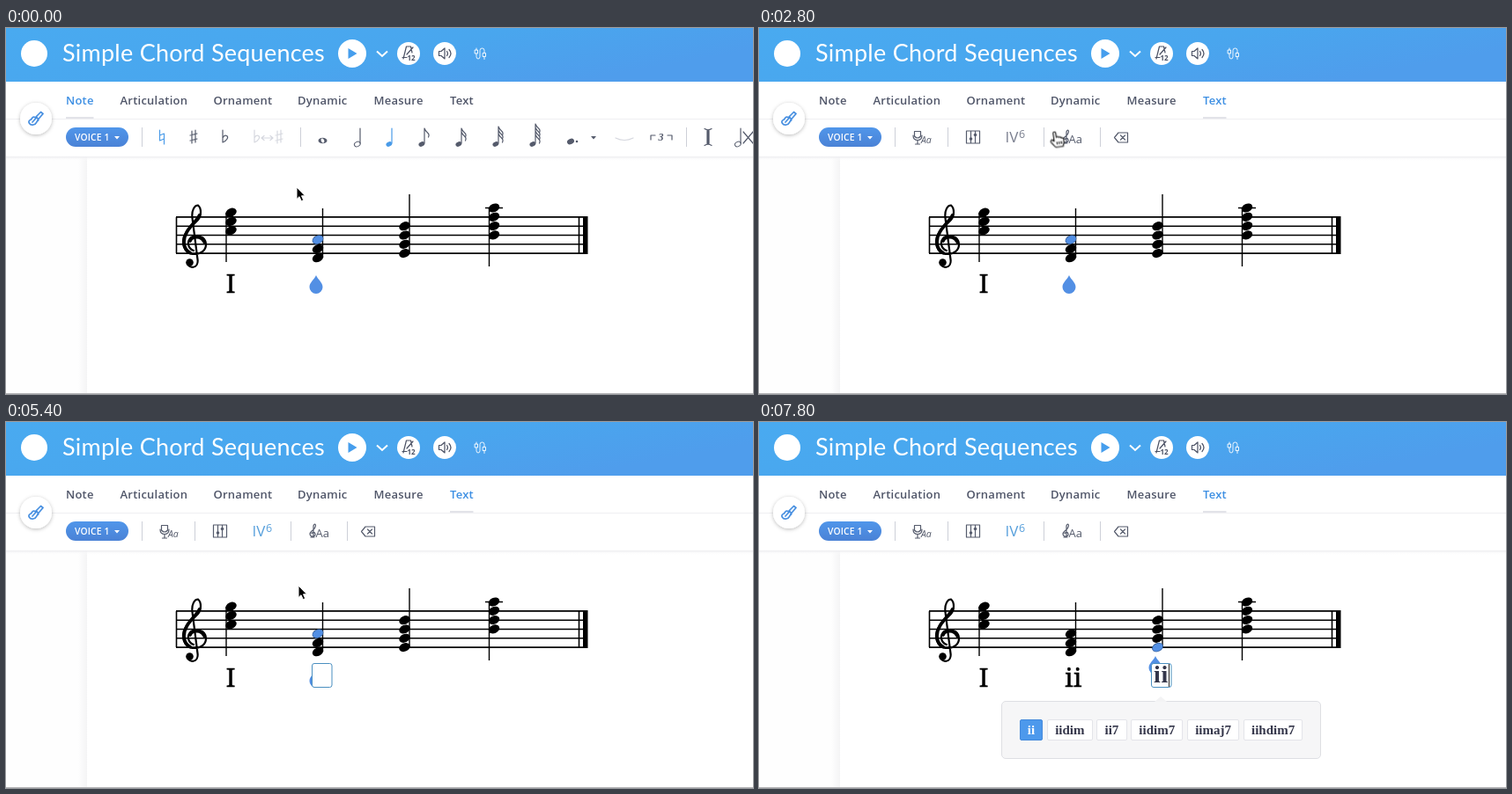
Write an HTML page that moves like this. It is 848 px wide and 416 px high and loops after 8000 ms.

```html
<!DOCTYPE html>
<html lang="en">
<head>
<meta charset="utf-8">
<title>Chord editor</title>
<style>
  html, body { margin: 0; width: 100%; height: 100%; overflow: hidden; background: #fff; }
  #stage { position: relative; width: 848px; height: 416px; overflow: hidden; }
  svg { position: absolute; inset: 0; }
  text { font-family: "Open Sans", sans-serif; }
  .title { font: 27px Lato, sans-serif; letter-spacing: .25px; fill: #fff; }
  .tab { font-size: 13px; font-weight: 600; letter-spacing: .25px; color: #505669; fill: currentColor; }
  .line { fill: none; stroke: currentColor; stroke-width: 1.2; stroke-linecap: round; stroke-linejoin: round; }
  .thin { stroke-width: .9; }
  .bold { stroke-width: 1.7; }
  .tools { color: #555b6c; fill: currentColor; }
  .numeral { font: 500 29px "Noto Serif", serif; text-anchor: middle; stroke: #000; stroke-width: .5; }
  .entry { font: bold 28px "Liberation Serif", serif; letter-spacing: .6px; text-anchor: middle; fill: #34364a; }
  .tip { font-size: 12px; font-weight: 600; letter-spacing: .8px; fill: #fff; text-anchor: middle; }
  .menu {
    position: absolute; top: 317px; transform: translateX(-50%); box-sizing: border-box; height: 66px;
    display: flex; gap: 4.4px; padding: 20px; border: 1px solid #dedfe3; border-radius: 5px;
    background: #f6f6f7; font: bold 15px/22px "Liberation Serif", serif; color: #34364a;
  }
  .menu::before {
    content: ""; position: absolute; left: 50%; top: -6px; margin-left: -7px;
    border: 7px solid transparent; border-top: 0; border-bottom: 6px solid #f3f3f4;
  }
  .menu span { height: 22px; padding: 0 8.3px; border: 1px solid #e3e4e9; border-radius: 2px; background: #fff; }
  .menu span:first-child { background: #4d99ec; border-color: #4389dc; color: #fff; }
</style>
</head>
<body>
<div id="stage">
<svg width="848" height="416" viewBox="0 0 848 416">
  <defs>
    <linearGradient id="sky" x2="1" y2=".4"><stop stop-color="#49aaf0"/><stop offset=".6" stop-color="#49a6ee"/><stop offset="1" stop-color="#4f9dec"/></linearGradient>
    <linearGradient id="pillFill" x2="0" y2="1"><stop stop-color="#5096ea"/><stop offset="1" stop-color="#4a82d6"/></linearGradient>
    <linearGradient id="edge"><stop stop-color="#fefefe"/><stop offset="1" stop-color="#f4f4f5"/></linearGradient>
    <linearGradient id="fall" x2="0" y2="1"><stop stop-color="#ececef"/><stop offset="1" stop-color="#fff" stop-opacity="0"/></linearGradient>
    <filter id="soft" x="-50%" y="-50%" width="200%" height="200%"><feDropShadow dx="0" dy="1" stdDeviation="2" flood-opacity=".28"/></filter>
    <path id="flat" class="line" d="M-2-9V5C3 3 5-1 2.500-2.500C1-3.200-1-2-2 0"/>
    <path id="sharp" class="line" d="M-2-7V7M2-8V6M-4-2l8-2M-4 4l8-2"/>
    <path id="drop" d="M0 0C2 5 7.500 8 7.500 13.500A7.500 7.500 0 0 1-7.500 13.500C-7.500 8-2 5 0 0Z" fill="#528fe4"/>
  </defs>

  <rect width="848" height="416" fill="#fff"/>
  <rect y="146" width="82" height="270" fill="#fefefe"/>
  <rect x="82" y="146" width="10" height="270" fill="url(#edge)"/>
  <rect y="146" width="848" height="5" fill="url(#fall)"/>
  <path d="M0 415.500H848" stroke="#b4b4b6"/>
  <path d="M0 103.500H848" stroke="#efeff2"/>

  <!-- header -->
  <rect width="848" height="61" fill="url(#sky)"/>
  <circle cx="32" cy="29" r="15" fill="#fff"/>
  <text class="title" x="64" y="38">Simple Chord Sequences</text>
  <g fill="#fff"><circle cx="393" cy="29" r="16"/><circle cx="457" cy="29" r="13"/><circle cx="498" cy="29" r="13"/></g>
  <path d="M388.500 23V35L398.500 29Z" fill="#469eed"/>
  <path d="M421 26.500l6 5.500 6-5.500" fill="none" stroke="#fff" stroke-width="2"/>
  <g class="line" color="#4b5164">
    <path d="M451 35L454.500 21H459.500L461 28M455 30L462 22M450 33.500H455"/>
    <path d="M491.500 26.500H494L498 23V35L494 31.500H491.500ZM500.500 26.500q2 2.500 0 5M503 24.500q4 4.500 0 9"/>
  </g>
  <text x="455.500" y="37" font-size="8" font-weight="700" fill="#4b5164">12</text>
  <path class="line thin" color="#fff" d="M534 23v2M532.500 25h3v4h-3zM534 29v3.500q0 2.500 2 2.500t2-2.500V25.500q0-2.500 2.500-2.500t2.500 2.500v3M541.500 28.500h3v4h-3zM543 32.500v3"/>

  <!-- tabs -->
  <g id="tabs"></g>
  <path id="noteBar" d="M68 102H99.500" stroke="#e2e3e9" stroke-width="2"/>
  <path id="textBar" d="M504 102H530.500" stroke="#e2e3e9" stroke-width="2"/>
  <circle cx="34" cy="103" r="18" fill="#fff" filter="url(#soft)"/>
  <path class="line bold" color="#478fe0" d="M33 102L39.500 95.500L42 97.500L36 104.500M33 101.500C29 100 30 104 27.500 104.500C24 106 27 111 31 110C35 109.500 34 106.500 36 105.500C38 104 36 102 33 101.500M30 107L35 101.500"/>
  <rect x="68" y="113" width="71" height="22" rx="11" fill="url(#pillFill)"/>
  <text x="78" y="128" font-size="10.300" font-weight="600" letter-spacing=".15" fill="#fff">VOICE 1</text>
  <path d="M123 123h6l-3 3.500z" fill="#fff"/>
  <path d="M154.500 113V135" stroke="#cdd0d8"/>

  <!-- note tools -->
  <g id="noteTools" class="tools">
    <path d="M334.500 113V135M772.500 113V135" stroke="#cdd0d8"/>
    <path class="line" color="#4a9be8" d="M174.500 116V128L179.500 126M179.500 132V120L174.500 122"/>
    <use href="#sharp" x="213" y="124"/><use href="#flat" x="248" y="125"/>
    <g color="#d6d8df"><use href="#flat" x="284" y="125"/><use href="#sharp" x="310" y="124"/>
      <path class="line" d="M290 125H303M293 122.500L290 125L293 127.500M300 122.500L303 125L300 127.500"/></g>
    <g id="durations"></g>
    <ellipse cx="641" cy="129" rx="4.200" ry="3" transform="rotate(-25 641 129)"/><circle cx="648" cy="129" r="1.300"/>
    <path d="M664 123h6l-3 3.500z"/>
    <path class="line" color="#d6d8df" d="M692 125Q702 130 712 125"/>
    <path class="line" d="M732 127V122H737M751 122H756V127"/>
    <text x="740.500" y="128" style="font:italic bold 12px 'Liberation Serif',serif">3</text>
    <path class="line" d="M793 114.500Q797 117 801 114.500M793 133.500Q797 131 801 133.500M797 116V132M796 116V132M798 116V132"/>
    <path class="line" d="M837 118L848 131M848 118L837 131"/>
  </g>

  <!-- text tools -->
  <g id="textTools" class="tools">
    <path d="M214.500 113V135M323.500 113V135M387.500 113V135" stroke="#cdd0d8"/>
    <path class="line" d="M176.500 117.500h7v5.500q-3.500 4-7 0zM175 122q0 5.500 5 5.500t5-5.500M180 127.500V132M177.500 132h5"/>
    <text x="184" y="131" font-size="10.500" font-style="italic">Aa</text>
    <path class="line" d="M235.500 117H250.500V131H235.500ZM240.500 117V131M245.500 117V131"/>
    <circle cx="240.500" cy="126" r="1.800"/><circle cx="245.500" cy="121.500" r="1.800"/>
    <g id="chordTool" color="#7b8090" fill="currentColor">
      <text x="279.500" y="130" font-size="17">IV</text><text x="295" y="125" font-size="12.500">6</text>
    </g>
    <path class="line" d="M349 131V118q1-3 2.500-1q0 4-4.500 7q-4 4 0 6q5 0 4-3t-4-.5M346 131h4"/>
    <text x="351.500" y="131" font-size="13">Aa</text>
    <path class="line" d="M403.500 124.500L408 119H418.500V130H408ZM410.500 122l5 5M415.500 122l-5 5"/>
  </g>

  <!-- score -->
  <g id="staff" stroke="#000" stroke-width="1.600"></g>
  <rect x="655" y="214" width="5.500" height="43"/>
  <g fill="none" stroke="#000" stroke-linecap="round">
    <path stroke-width="2.200" d="M206 267C207 274 219 274 217.500 263L211.500 216C210.500 207 214 201.500 218 201.500C222 205 222 213 218 218C212 225 201 231 201 243C201 252 207 257 214 257C221 257 227 253 227 246C227 239 221 236 216 236C210 236 206 241 207 246C207.500 249 210 252 213 253"/>
    <path stroke-width="3.800" d="M219.500 213C215 222 202 230 202 243C202 249 205 254 209 255.500M209 242C211 236 222 236 225 243"/>
  </g>
  <circle cx="208.500" cy="266.500" r="4.300"/>
  <g id="chords"></g>
  <text class="numeral" x="255" y="301">I</text>
  <text class="numeral" id="committed" x="357" y="301" letter-spacing=".5">ii</text>
  <g id="entries"></g>

  <g id="tooltip">
    <path d="M285 147L292 140L299 147Z" fill="#2d2e3d"/>
    <rect x="198" y="145.500" width="187" height="31.500" rx="15.750" fill="#2d2e3d"/>
    <text class="tip" x="292" y="165.500">Classic chord (⌘ + ⇧ + K)</text>
  </g>
</svg>
<div id="menus"></div>
<svg width="848" height="416" viewBox="0 0 848 416">
  <g id="pointer">
    <path id="arrow" d="M0 0V13.500L3 10.700L5.300 15.700L7.700 14.600L5.500 9.800H9.500Z" stroke="#fff" stroke-width="1"/>
    <path id="hand" transform="rotate(-8)" fill="#fff" stroke="#000" stroke-width="1.100" stroke-linejoin="round"
      d="M-1.500 1C-1.500-1 1.500-1 1.500 1V6C2 5 4 5 4.300 6.500C5 5.600 7 6 7 7.500C8 7 9.500 7.500 9.500 9V12C9.500 14 8 15 8 17H-.5C-2 15-4 13-5 11C-6 9-4 7.500-3 8.500L-1.500 10ZM1.500 11V14M4 11V14M6.500 11V14"/>
  </g>
</svg>
</div>
<script>
const LOOP = 8000, TICK = 200, BLUE = '#528fe4';
const $ = id => document.getElementById(id);
const add = (id, markup) => $(id).insertAdjacentHTML('beforeend', markup);

// Hard changes: table of [ms, value]
function steps(id, prop, table) {
  const frames = table.map(([ms, value]) => ({ offset: ms / LOOP, [prop]: value, easing: 'steps(1, end)' }));
  frames.push({ offset: 1, [prop]: table.at(-1)[1] });
  $(id).animate(frames, { duration: LOOP, iterations: Infinity });
}

function show(id, ...ranges) {
  const table = ranges[0][0] ? [[0, 0]] : [];
  for (const [from, to = LOOP] of ranges) {
    table.push([from, 1]);
    if (to < LOOP) table.push([to, 0]);
  }
  steps(id, 'opacity', table);
}

// Tabs and durations
[['Note', 68], ['Articulation', 129.5], ['Ornament', 235.5], ['Dynamic', 331], ['Measure', 417.5], ['Text', 504]]
  .forEach(([label, x]) => add('tabs', `<text class="tab" id="tab${label}" x="${x}" y="87">${label}</text>`));

const head = (x, y, rx, ry, extra = '') =>
  `<ellipse cx="${x}" cy="${y}" rx="${rx}" ry="${ry}" transform="rotate(-25 ${x} ${y})" ${extra}/>`;

function duration(x, flags, top, { open = false, color = 'currentColor' } = {}) {
  let marks = `M${x} 131V${top}`;
  for (let i = 0; i < flags; i++) marks += `M${x} ${top + i * 4}q1 3 3.500 5t1 5`;
  const fill = open ? 'fill="none" stroke="currentColor"' : '';
  add('durations', `<g color="${color}" fill="currentColor">${head(x - 3.2, 132, 3.5, 2.6, fill)}<path class="line" d="${marks}"/></g>`);
}
add('durations', '<ellipse cx="359.500" cy="128" rx="5" ry="3.300"/><ellipse cx="359.500" cy="128" rx="1.700" ry="2.700" fill="#fff" transform="rotate(-25 359.500 128)"/>');
duration(402, 0, 114, { open: true });
duration(438, 0, 114, { color: '#4a9be8' });
[[475, 114], [517, 114], [559, 112], [601, 109]].forEach(([x, top], i) => duration(x, i + 1, top));
duration(834, 0, 114, { open: true });

// Staff and chords
const GAP = 10.3, TOP = 214.9, BOTTOM = TOP + 4 * GAP;
let staff = `M193.500 ${TOP}V${BOTTOM}M650.500 ${TOP}V${BOTTOM}`;
for (let i = 0; i < 5; i++) staff += `M193 ${TOP + i * GAP}H660`;
add('staff', `<path d="${staff}" fill="none"/>`);

const noteHead = (x, y) => head(x, y, 6.5, 4.7);

function chord(x, first, count, stemX, stemTop, stemEnd, extra = '') {
  let notes = `<path d="M${stemX} ${stemTop}V${stemEnd}${extra}" stroke="#000" stroke-width="1.400"/>`;
  for (let i = 0; i < count; i++) notes += noteHead(x, first + i * GAP);
  add('chords', notes);
}
chord(255.5, 209.7, 3, 250, 210, 266);
chord(354, 240.6, 3, 359.5, 205, 261);
chord(452.5, 225.2, 4, 458, 189, 256);
chord(554, 204.5, 4, 548.5, 204, 271, 'M544 204.500H564');
add('chords', `<g id="pick0" fill="${BLUE}">${noteHead(354, 240.6)}</g><g id="pick1" fill="${BLUE}">${noteHead(452.5, 256.1)}</g>`);

// Entry fields with caret and suggestions
function field(n, x, dropX, dropY) {
  add('entries', `<use id="drop${n}" href="#drop" x="${dropX}" y="${dropY}"/>
    <g id="field${n}">
      <rect x="${x - 11}" y="274.500" width="22.500" height="27" rx="2.500" fill="#fff" stroke="#4a8fc0"/>
      <text class="entry" id="one${n}" x="${x}" y="296">i</text>
      <text class="entry" id="two${n}" x="${x}" y="296">ii</text>
      <g id="blink${n}"><rect id="caret${n}" x="${x - .5}" y="275" width="1" height="26" fill="#222"/></g>
    </g>`);
}
field(0, 358.5, 352, 281);
field(1, 456.5, 450, 266);

function menu(id, x, root) {
  const items = ['', 'dim', '7', 'dim7', 'maj7', 'hdim7'].map(s => `<span>${root + s}</span>`).join('');
  add('menus', `<div class="menu" id="${id}" style="left:${x}px">${items}</div>`);
}
menu('menuOne', 357.5, 'i');
menu('menuTwo', 357.5, 'ii');
menu('menuNext', 456.5, 'ii');

// Timeline
const TAB = 1800, CLICK = 4000, TYPE = 6200, TYPE2 = 6400, COMMIT = 7000, NEXT = 7800;
const ACTIVE = '#3d8fe3', IDLE = '#505669';
steps('tabNote', 'color', [[0, ACTIVE], [TAB, IDLE]]);
steps('tabText', 'color', [[0, IDLE], [TAB, ACTIVE]]);
show('noteBar', [0, TAB]);
show('noteTools', [0, TAB]);
show('textBar', [TAB]);
show('textTools', [TAB]);
show('tooltip', [3000, 5000]);
steps('chordTool', 'color', [[0, '#7b8090'], [CLICK, '#58a0dc']]);

show('pick0', [0, COMMIT]);
show('drop0', [0, COMMIT]);
show('field0', [CLICK, COMMIT]);
show('blink0', [CLICK, 4400], [5000, 5400], [6000, COMMIT]);
steps('caret0', 'transform', [[0, 'translateX(0px)'], [TYPE, 'translateX(5px)'], [TYPE2, 'translateX(9px)']]);
show('one0', [TYPE, TYPE2]);
show('two0', [TYPE2, COMMIT]);
show('menuOne', [TYPE, TYPE2]);
show('menuTwo', [TYPE2, COMMIT]);

show('committed', [COMMIT]);
show('pick1', [COMMIT]);
show('drop1', [COMMIT]);
show('field1', [COMMIT]);
show('blink1', [COMMIT, 7400], [NEXT]);
steps('caret1', 'transform', [[0, 'translateX(1px)'], [NEXT, 'translateX(9px)']]);
$('one1').remove();
show('two1', [NEXT]);
show('menuNext', [NEXT]);

// Pointer: eased path sampled once per tick
const path = [[0, 330, 181], [200, 330, 181], [1000, 507, 96], [1200, 507, 96], [1600, 520, 84], [2200, 520, 84],
  [3000, 301, 125], [4000, 301, 125], [4600, 327, 168], [5000, 332, 186], [LOOP, 332, 186]];
function pointerAt(t) {
  const i = path.findIndex(([ms]) => ms > t);
  const [t0, x0, y0] = path[i - 1], [t1, x1, y1] = path[i];
  const p = (t - t0) / (t1 - t0), e = p * p * (3 - 2 * p);
  return `translate(${x0 + (x1 - x0) * e}px, ${y0 + (y1 - y0) * e}px)`;
}
steps('pointer', 'transform', Array.from({ length: LOOP / TICK }, (_, i) => [i * TICK, pointerAt(i * TICK)]));
show('pointer', [0, TYPE]);
show('hand', [1000, 2400], [2800, 4200]);
show('arrow', [0, 1000], [2400, 2800], [4200]);
</script>
</body>
</html>
```
